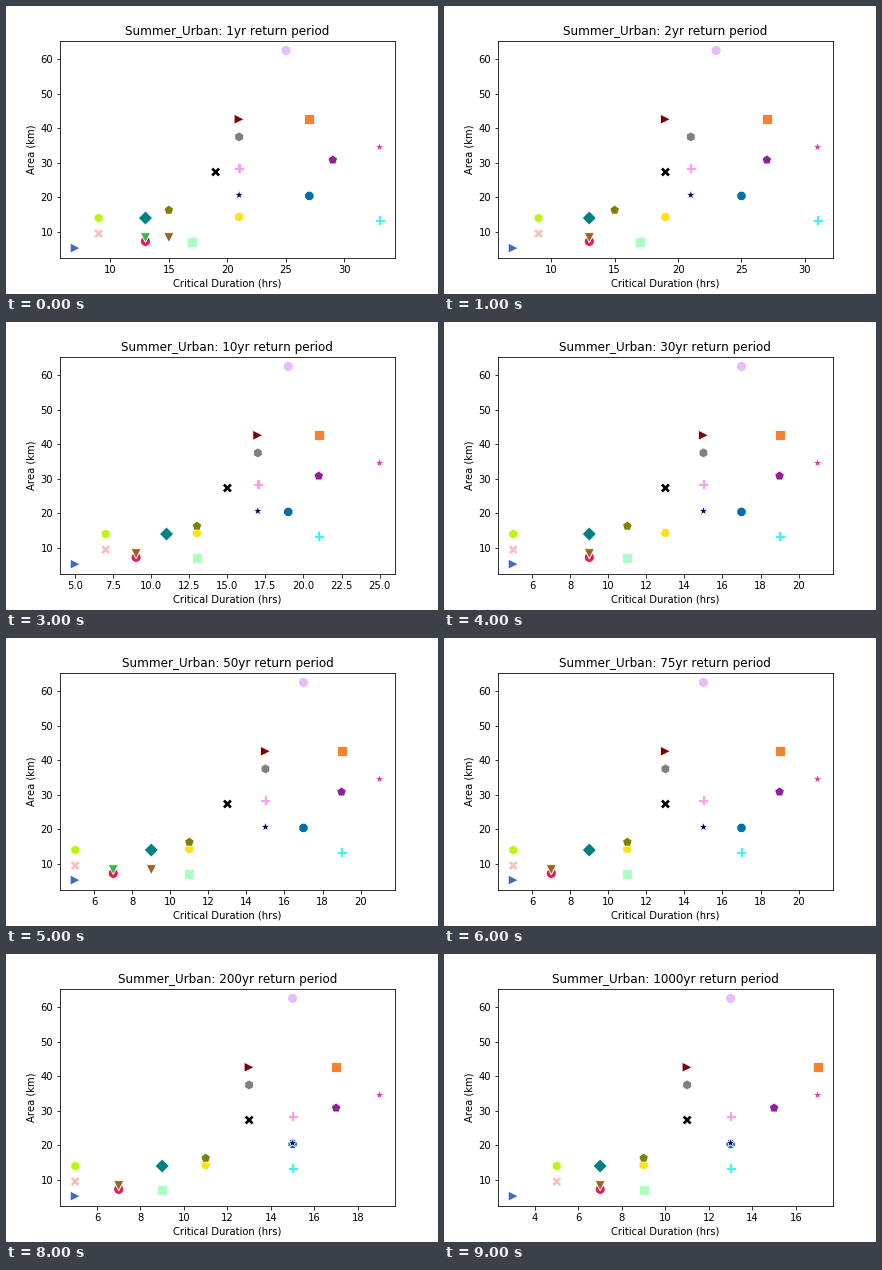
Animation, 432 px wide and 288 px high, one loop 10000 ms. Source, as a matplotlib script:

```python
import matplotlib.pyplot as plt
import numpy as np
from matplotlib.animation import FuncAnimation
from matplotlib.markers import MarkerStyle

PERIODS = [1, 2, 5, 10, 30, 50, 75, 100, 200, 1000]

# marker, colour, area, duration at the shortest and the longest period
SITES = [
    ("o", "#de2054", 7.30, 13.5, 6.1),
    ("v", "#3cb44b", 8.35, 13.5, 6.1),
    ("8", "#ffe119", 14.35, 20.1, 9),
    (">", "#4068c4", 5.35, 6.7, 3.7),
    ("s", "#f58231", 42.80, 27.4, 16.2),
    ("p", "#911e9c", 30.85, 28.2, 15.8),
    ("P", "#46f0f0", 13.35, 32.8, 13),
    ("*", "#e636b8", 34.55, 33, 17),
    ("h", "#bcf60c", 14.05, 9, 4.2),
    ("X", "#fabebe", 9.55, 9, 4.2),
    ("D", "#008080", 14.05, 13.5, 7.2),
    ("o", "#e6beff", 62.50, 24.5, 13.5),
    ("v", "#9a6324", 8.35, 14.5, 6.1),
    ("8", "#0070a8", 20.45, 27, 13.8),
    (">", "#800000", 42.60, 21, 11.95),
    ("s", "#aaffc3", 7.25, 17.2, 8.2),
    ("p", "#808000", 16.35, 15.2, 9.5),
    ("P", "#ff9eea", 28.40, 21.6, 13),
    ("*", "#000075", 20.70, 21.6, 13),
    ("h", "#808080", 37.50, 21.8, 11.8),
    ("X", "#000000", 27.35, 19, 11),
]
markers, colors, areas, first, last = zip(*SITES)
first, last = np.array(first), np.array(last)


def padded(values, pad=0.05):
    lo, hi = np.min(values), np.max(values)
    gap = (hi - lo) * pad
    return lo - gap, hi + gap


def marker_path(name):
    style = MarkerStyle(name)
    return style.get_path().transformed(style.get_transform())


def durations(period):
    """Shared fall along the log of the period, kept to odd hours."""
    fall = np.interp(np.log(period), np.log([1, 2, 5, 10, 30, 100, 1000]),
                     [0, 0.12, 0.4, 0.55, 0.7, 0.81, 1])
    hours = first + (last - first) * fall
    return 2 * np.floor(hours / 2) + 1


plt.rcParams.update({"font.family": "DejaVu Sans", "font.size": 10,
                     "text.kerning_factor": 6})
fig, ax = plt.subplots(figsize=(6, 4), dpi=72)
fig.subplots_adjust(left=0.125, right=0.9, bottom=0.125, top=0.88)
ax.set_xlabel("Critical Duration (hrs)")
ax.set_ylabel("Area (km)")
ax.set_ylim(padded(areas))
title = ax.set_title("", fontsize=12)

dots = ax.scatter(first, areas, s=100, c=colors,
                  edgecolor="white", linewidth=0.8)
dots.set_paths([marker_path(m) for m in markers])


def draw(i):
    hours = durations(PERIODS[i])
    dots.set_offsets(np.column_stack([hours, areas]))
    ax.set_xlim(padded(hours))
    title.set_text(f"Summer_Urban: {PERIODS[i]}yr return period")
    return dots, title


anim = FuncAnimation(fig, draw, frames=len(PERIODS), interval=1000,
                     repeat=True, repeat_delay=0, blit=False)
plt.show()
```
